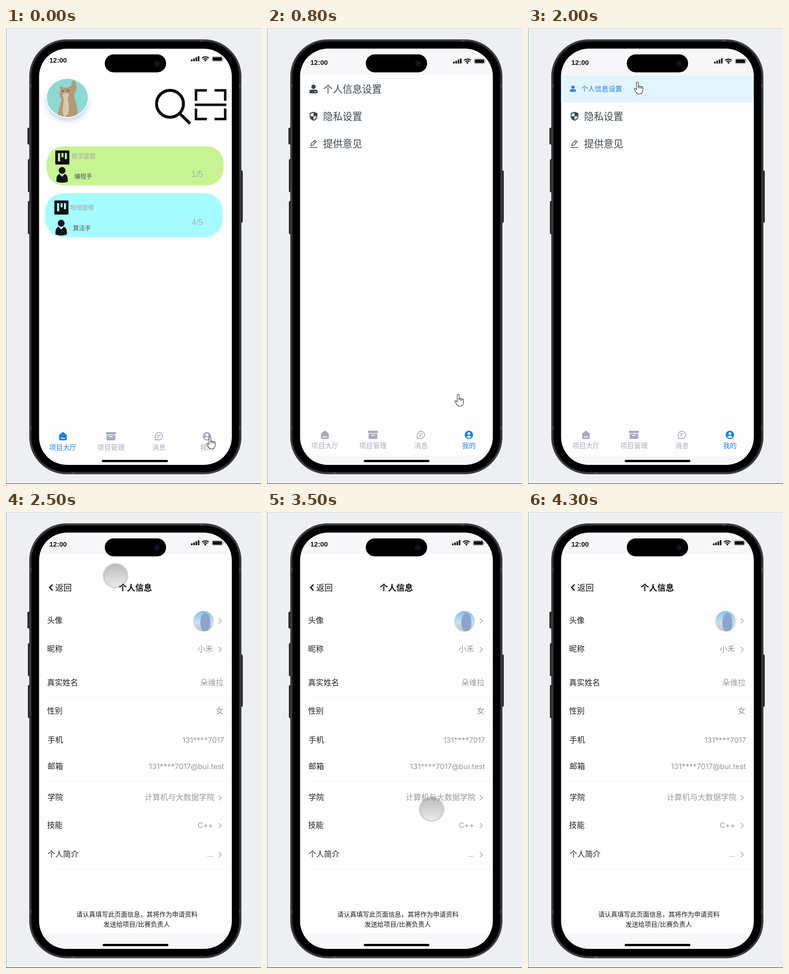
Recreate the animation shown at these times as an HTML page. Size 559x1002 px, loop 5.1 s.

```html
<!DOCTYPE html>
<html lang="zh-CN">
<head>
<meta charset="utf-8">
<title>Phone prototype</title>
<style>
html, body { margin: 0; width: 100%; height: 100%; overflow: hidden; background: #eeeff3; }
svg { display: block; width: 100%; height: 100%; }
text { font-family: "Noto Sans CJK SC", "Noto Sans CJK", sans-serif; }
.clock { font: bold 15px "Liberation Sans", sans-serif; fill: #111; }
.count { font: 18px "Liberation Sans", sans-serif; fill: #a9aeae; }
.num { font-family: Inter, "Noto Sans CJK SC", sans-serif; font-size: 16.4px; font-feature-settings: "calt" 0; }
.end { text-anchor: end; }
.mid { text-anchor: middle; }
.line { fill: none; stroke: currentColor; }
.cut { fill: none; stroke: #fff; stroke-width: 1.8; stroke-linecap: round; }
</style>
</head>
<body>
<svg viewBox="0 0 559 1002" preserveAspectRatio="none">
<defs>
  <clipPath id="screen"><rect x="72.5" y="45.5" width="422.5" height="914.5" rx="61"/></clipPath>
  <clipPath id="catClip"><ellipse cx="134.5" cy="153.5" rx="45" ry="42"/></clipPath>
  <clipPath id="toyClip"><circle cx="433" cy="240" r="22.5"/></clipPath>
  <linearGradient id="sky" x2="0" y2="1">
    <stop stop-color="#86bde8"/><stop offset=".55" stop-color="#c9e0f0"/><stop offset="1" stop-color="#cdbfb2"/>
  </linearGradient>
  <linearGradient id="press" x2="0" y2="1">
    <stop stop-color="#000" stop-opacity=".26"/><stop offset="1" stop-color="#000" stop-opacity=".08"/>
  </linearGradient>
  <filter id="soft" x="-50%" y="-50%" width="200%" height="200%"><feGaussianBlur stdDeviation="6"/></filter>
  <filter id="blur" x="-50%" y="-50%" width="200%" height="200%"><feGaussianBlur stdDeviation="1.2"/></filter>

  <text id="clock" class="clock" x="95" y="75.5">12:00</text>
  <g id="signal" fill="#111">
    <path d="M405.5 69h3.4v4h-3.4zM410.5 67h3.4v6h-3.4zM415.5 64.5h3.4v8.5h-3.4zM420.5 62h3.4v11h-3.4z"/>
    <path fill="none" stroke="#111" stroke-width="2.2" d="M429.7 66.3a10.4 10.4 0 0 1 14.6 0M432.5 69.3a6.4 6.4 0 0 1 9 0"/>
    <path d="M437 74l-2.6-2.7a3.7 3.7 0 0 1 5.2 0z"/>
    <rect x="451.5" y="62.5" width="23.5" height="11" rx="3" fill="none" stroke="#999"/>
    <rect x="453" y="64" width="20.5" height="8" rx="1.6"/>
    <path d="M476 66q2.4 2 0 4z" fill="#999"/>
  </g>
  <path id="board" fill="#111" fill-rule="evenodd" d="M110 269h27q2 0 2 2v27q0 2-2 2h-27q-2 0-2-2v-27q0-2 2-2zM114 275v18h4.5v-18zM121.5 275v9h4.500v-9zM129 275v13h4.5v-13z"/>
  <g id="member" fill="#111">
    <circle cx="123" cy="313" r="7.5"/>
    <path d="M117 320.5l6 6.5 6-6.5q6.5 3 6.5 12v5q-12.5 5-25 0v-5q0-9 6.5-12z"/>
  </g>
  <g id="userIcon" fill="currentColor">
    <circle cy="-4.8" r="4.8"/>
    <path fill-rule="evenodd" d="M-5 1.5h10q4 0 4 4v2q0 2-2 2h-14q-2 0-2-2v-2q0-4 4-4zM2 5v1.5h3.5v-1.5z"/>
  </g>
  <path id="chevron" class="line" d="M-3-5.5l5.5 5.5-5.5 5.5" stroke-width="2.1"/>

  <g id="tab0">
    <path fill="currentColor" d="M-1-9q1-.7 2 0l6.6 5.4q.9.8.9 1.8v8.8q0 2-2 2h-13q-2 0-2-2v-8.8q0-1 .9-1.8z"/>
    <path class="cut" d="M-4 4.500h8"/>
  </g>
  <g id="tab1">
    <path fill="currentColor" d="M-10-9h20q1 0 1 1v4h-22v-4q0-1 1-1zM-9.5-2.5h19v9.5q0 2-2 2h-15q-2 0-2-2z"/>
    <path class="cut" d="M-3 1h6"/>
  </g>
  <path id="tab2" class="line" stroke-width="1.8" d="M-8 8v-8a8 8 0 1 1 8 8zM-4-2h8M-4 2h5"/>
  <g id="tab3">
    <circle r="9.2" fill="currentColor"/>
    <circle cy="-2.8" r="2.9" fill="#fff"/><path fill="#fff" d="M-5.6 4.2q5.6-5 11.2 0q-5.6 5-11.2 0z"/>
  </g>
</defs>

<rect width="559" height="1002" fill="#eeeff3"/>
<path d="M.5 0v1002" stroke="#6fb4da"/>
<path d="M0 .5h559" stroke="#b9d6ea"/>
<path d="M0 1001.5h559" stroke="#222"/>

<g fill="#2e2e30" stroke="#1c1c1e">
  <rect x="47.5" y="219.5" width="7" height="36" rx="2"/>
  <rect x="48.5" y="288.5" width="7" height="72" rx="2"/>
  <rect x="48.5" y="380.5" width="7" height="72" rx="2"/>
  <rect x="511.5" y="313.5" width="7" height="114" rx="2"/>
</g>
<rect x="51.5" y="25.5" width="464" height="954.5" rx="81" fill="#424244" stroke="#2c2c2e"/>
<rect x="55.5" y="29.5" width="456" height="946.5" rx="77" fill="#000" stroke="#1e1e20" stroke-width="2"/>
<path d="M52 127h4M511 127h4M52 878h4M511 878h4M429 26v4M148 976v4" stroke="#5d5d60" stroke-width="7" opacity=".55"/>

<g clip-path="url(#screen)">
  <rect x="72" y="45" width="424" height="916" fill="#fefefe"/>

  <g id="hall">
    <use href="#clock"/><use href="#signal"/>
    <ellipse cx="134.5" cy="162" rx="46" ry="42" fill="#9fb4dc" opacity=".6" filter="url(#soft)"/>
    <ellipse cx="134.5" cy="153.5" rx="47" ry="44" fill="#fff"/>
    <g clip-path="url(#catClip)">
      <rect x="86" y="108" width="98" height="92" fill="#8ed8d5"/>
      <path fill="#b59a76" d="M119 136l-1-9 8 4h9l8-4 1-9q3-5 8 0l3 14-6 17q6 18 8 36l-5 14h-38q-1-14 4-27l4-16q-7-8-3-20z"/>
      <path fill="#d9c8ac" d="M124 145q8-4 14 0l-3 12q6 15 1 32l-8 7q-7-12-1-36z"/>
      <path fill="#7d6549" d="M122 137h5v3h-5zM133 136h5v3h-5z"/>
    </g>
    <g fill="none" stroke="#0d0d0d">
      <circle cx="359.5" cy="166.5" r="29.5" stroke-width="6.5"/>
      <path d="M381 188l22.5 22" stroke-width="6.5"/>
      <path stroke-width="5.5" d="M416.5 160v-23h24M457 137h23.500v23M414 168.7h69M416.5 177v23h24M457 200h23.5v-23"/>
    </g>
    <rect x="89" y="260" width="388" height="86" rx="37" fill="#c7f493"/>
    <rect x="86" y="363" width="389" height="97" rx="40" fill="#a5fbff"/>
    <use href="#board"/><use href="#board" x="-2" y="110"/>
    <use href="#member"/><use href="#member" x="-2" y="116"/>
    <g font-size="13" fill="#a9a9a9">
      <text x="144" y="286">数学建模</text><text x="140.5" y="399">物理建模</text>
    </g>
    <g font-size="13" font-weight="500" fill="#4c5350">
      <text x="150" y="329.5">编程手</text><text x="147" y="444">算法手</text>
    </g>
    <text class="count" x="407" y="327">1/5</text><text class="count" x="407" y="433">4/5</text>
    <g id="hallTabs"></g>
    <rect x="210" y="949" width="145" height="5" rx="2.5" fill="#000"/>
  </g>

  <g id="mine">
    <path d="M72 45h424v58h-424zM72 940h424v21h-424z" fill="#f7f6f8"/>
    <use href="#clock" y="5"/><use href="#signal" x="2.5" y="5"/>
    <g color="#3d464e" fill="#3d464e" font-size="21.4">
      <g id="plain"><use href="#userIcon" x="102" y="134"/><text x="123" y="142">个人信息设置</text></g>
      <g id="active" color="#1b7ff2" fill="#1b7ff2" font-size="15">
        <rect x="72" y="104" width="424" height="59.5" fill="#e2f4fd"/>
        <use href="#userIcon" transform="translate(98.5 133.5) scale(.72)"/>
        <text x="116.5" y="139" font-weight="500">个人信息设置</text>
      </g>
      <path d="M102 184l8.5 3v7q0 6.5-8.5 10-8.5-3.5-8.5-10v-7z"/>
      <path fill="#fff" d="M102 186.5v7.5h6.500q-.5 5-6.5 7.8v-7.8h-6.5v-5.2z"/>
      <text x="123" y="202">隐私设置</text>
      <path class="line" stroke-width="1.4" d="M93 262.5h17M96 258.5l1-4.5 7.5-7.5 3.5 3.5-7.5 7.5zM102 249l3.5 3.5"/>
      <text x="123" y="262">提供意见</text>
    </g>
    <g id="mineTabs"></g>
    <rect x="212" y="949" width="144" height="5" rx="2.5" fill="#000"/>
  </g>

  <g id="info">
    <path d="M72 45h424v47h-424zM72 926h424v35h-424z" fill="#f7f6f8"/>
    <use href="#clock"/><use href="#signal"/>
    <path d="M102 159.5l-6.5 6.5 6.5 6.5" fill="none" stroke="#111" stroke-width="2.6"/>
    <text x="108" y="172.5" font-size="18" fill="#111">返回</text>
    <text class="mid" x="283.5" y="172.5" font-size="18.2" font-weight="700" fill="#111">个人信息</text>
    <path d="M88 270.5h407M88 333.5h407M88 407.5h407M88 470.5h407M88 591.5h407M88 720.5h407M97 784.5h398" stroke="#f3f3f7"/>
    <g clip-path="url(#toyClip)">
      <rect x="410" y="217" width="46" height="46" fill="url(#sky)"/>
      <ellipse cx="437" cy="243" rx="11" ry="21" fill="#8ba5cd"/>
    </g>
    <g id="rows" font-size="17"></g>
    <g class="mid" font-size="14" fill="#1c1c1c">
      <text x="287" y="889">请认真填写此页面信息，其将作为申请资料</text>
      <text x="286.5" y="911">发送给项目/比赛负责人</text>
    </g>
    <rect x="212" y="949" width="144" height="5" rx="2.5" fill="#000"/>
  </g>
</g>

<rect x="216.5" y="58" width="134.5" height="39.5" rx="19.7" fill="#000"/>
<circle cx="331" cy="78" r="7" fill="#0e1016"/><circle cx="331" cy="78" r="3" fill="#171b2c"/>

<g id="hand" stroke="#333" stroke-width="1.2" stroke-linejoin="round">
  <path fill="#fff" d="M6 2.5a2 2 0 0 1 4 0V11c.3-2 3.3-2 3.3.5c.2-1.8 3.2-1.5 3.2.6c.2-1.6 3.2-1.2 3.2.9v5c0 5-2.5 9-8 9c-5 0-6.5-3-10.5-9.5c-1.3-2 1-3.5 2.8-1.8l2 2z"/>
  <path fill="none" d="M10 10v4.5M13.3 11.5v3.5M16.5 12v3.5"/>
</g>
<g id="touch">
  <circle r="26" fill="none" stroke="#000" stroke-opacity=".24" stroke-width="2.8" filter="url(#blur)"/>
  <circle r="25" fill="#fff" fill-opacity=".35"/>
  <circle r="25" fill="url(#press)"/>
</g>
</svg>

<script>
const $ = id => document.getElementById(id);

function tabs(id, x, y, labelY, active) {
  $(id).innerHTML = ["项目大厅", "项目管理", "消息", "我的"].map((label, i) => {
    const cx = x + i * 105.2;
    const icon = i === active ? "#1a7ff0" : "#a6abc2";
    const ink = i === active ? "#2583ee" : "#aaaebd";
    return `<use href="#tab${i}" x="${cx}" y="${y}" color="${icon}"/>
      <text class="mid" x="${cx}" y="${labelY}" font-size="15" fill="${ink}">${label}</text>`;
  }).join("");
}
tabs("hallTabs", 124.8, 897, 926.5, 0);
tabs("mineTabs", 127, 894, 923, 3);

// label, x, middle y, value, right edge, has chevron, class
const rows = [
  ["头像", 90, 238, "", 0, 1],
  ["昵称", 90, 301, "小禾", 454, 1],
  ["真实姓名", 90, 375, "朵维拉", 477],
  ["性别", 90, 437, "女", 477],
  ["手机", 91, 501, "131****7017", 478, 0, "num"],
  ["邮箱", 91, 559, "131****7017@bui.test", 478, 0, "num"],
  ["学院", 91, 627, "计算机与大数据学院", 457, 1],
  ["技能", 90, 688, "C++", 454, 1, "num"],
  ["个人简介", 91, 752, "...", 455, 1, "num"]
];
$("rows").innerHTML = rows.map(([label, x, y, value, right, more, cls = ""]) =>
  `<text x="${x}" y="${y + 6.3}" font-weight="500" fill="#1d2126">${label}</text>
   <text class="end ${cls}" x="${right}" y="${y + 6.3}" fill="#999">${value}</text>
   ${more ? `<use href="#chevron" x="469.5" y="${y + 1}" color="#bbb"/>` : ""}`).join("");

// time, x, y
const handPath = [[600, 439, 898], [700, 433, 876], [800, 411, 804], [900, 370, 660],
  [1000, 318, 490], [1100, 270, 331], [1200, 249, 214], [1300, 237, 142], [1400, 232, 118]];
const touchPath = [[2400, 240, 138], [2500, 240, 140], [2700, 245, 165], [2900, 254, 216],
  [3000, 259, 264], [3100, 267, 329], [3300, 318, 503], [3500, 361, 653],
  [3800, 400, 765], [4100, 436, 880], [4200, 439, 966]];

function place(id, path, t) {
  const next = path.findIndex(k => k[0] >= t);
  const i = next < 0 ? path.length - 1 : Math.max(1, next);
  const a = path[i - 1], b = path[i];
  const u = Math.min(1, Math.max(0, (t - a[0]) / (b[0] - a[0])));
  const at = n => a[n] + (b[n] - a[n]) * u;
  $(id).setAttribute("transform", `translate(${at(1)} ${at(2)})`);
}
const show = (id, on) => $(id).style.display = on ? "" : "none";

const LOOP = 5100, STEP = 100;
let start;
function draw(now) {
  start ??= now;
  const t = Math.floor((now - start) % LOOP / STEP) * STEP;
  show("hall", t < 600);
  show("mine", t >= 600 && t < 2400);
  show("plain", t < 2000);
  show("active", t >= 2000);
  show("info", t >= 2400);
  show("hand", t < 2400);
  show("touch", t >= 2400 && t < 4300);
  place("hand", handPath, t);
  place("touch", touchPath, t);
  requestAnimationFrame(draw);
}
requestAnimationFrame(draw);
</script>
</body>
</html>
```
